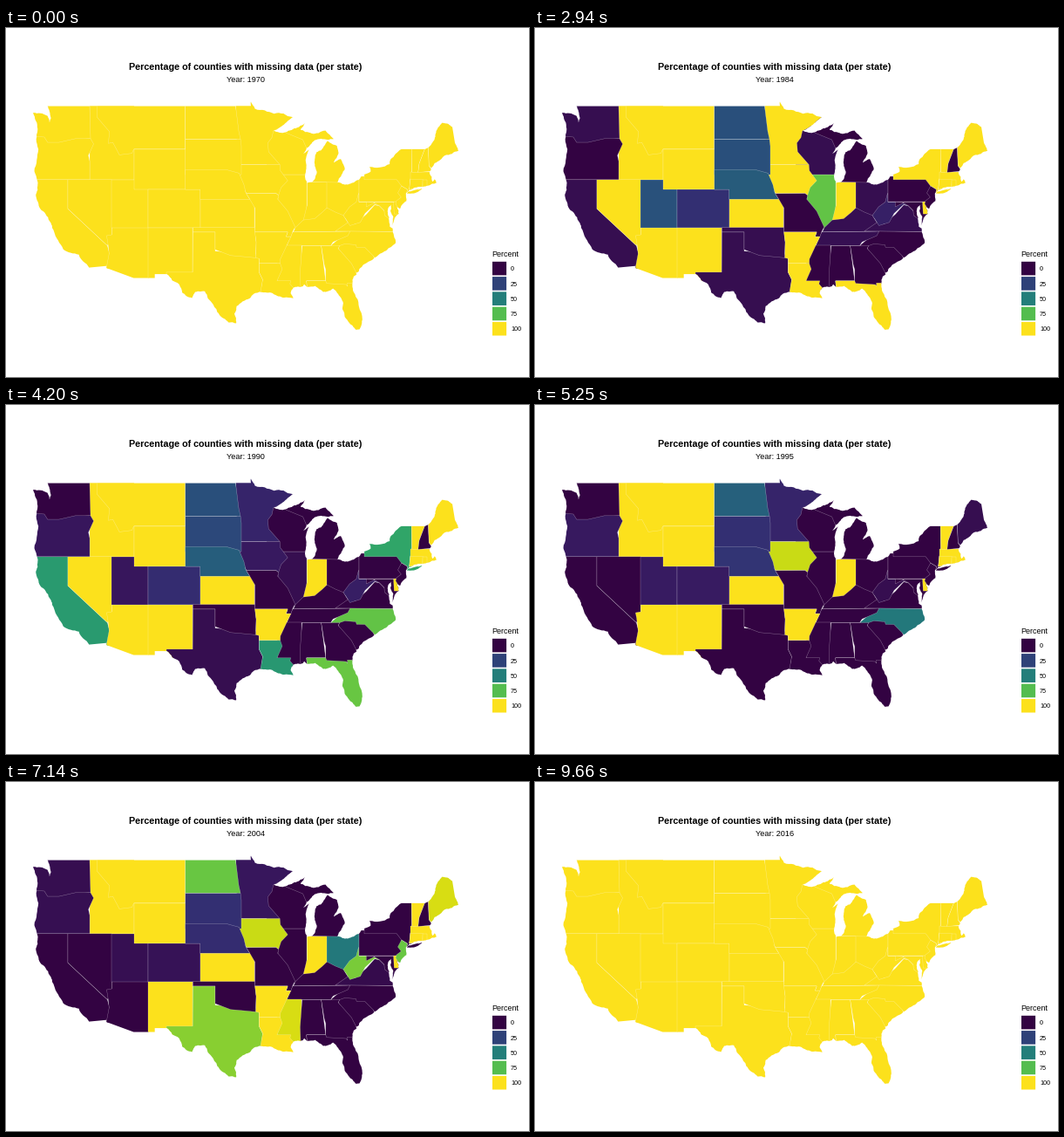
Recreate the animation shown at these times as a matplotlib script. Size 600 by 400 pixels, loop 9.87 s.

```python
import random

import matplotlib
import matplotlib.pyplot as plt
import numpy as np
from matplotlib.animation import FuncAnimation
from matplotlib.patches import Polygon, Rectangle
from matplotlib.path import Path

matplotlib.rcParams["font.family"] = "Liberation Sans"
FIRST_YEAR, LAST_YEAR, STEP_MS = 1970, 2016, 210

fig = plt.figure(figsize=(6, 4), dpi=100, facecolor="white")
ax = fig.add_axes([0, 0, 1, 1])
ax.set(xlim=(0, 600), ylim=(400, 0))
ax.axis("off")


def mercator(lat):
    return np.log(np.tan(np.pi / 4 + np.radians(lat) / 2))


def project(flat):
    """Degrees west and north, alternating, to stage pixels."""
    west, north = np.reshape(flat, (-1, 2)).T
    x = 31 + (124.73 - west) * 8.45
    y = 89.3 + 484 * (mercator(49) - mercator(north))
    return np.column_stack([x, y])


def shore(*flat, passes=3):
    """A coast through key points, roughened by seeded midpoint displacement."""
    rng = random.Random(len(flat))
    points = project(flat)
    for _ in range(passes):
        finer = [points[0]]
        for a, b in zip(points, points[1:]):
            dx, dy = b - a
            shift = rng.uniform(-0.1, 0.1)
            finer += [(a + b) / 2 + shift * np.array([-dy, dx]), b]
        points = np.array(finer)
    return points


def shade(percent):
    """Viridis, shown with a 1.8 display gamma."""
    rgb = np.array(matplotlib.colormaps["viridis"](percent / 100)[:3])
    r, g, b = np.where(rgb > 0.04, ((rgb + 0.055) / 1.055) ** 2.4, rgb / 12.92)
    return np.array([0.95 * r + 0.05 * g, g, b]) ** (1 / 1.8)


pacific = shore(122.76, 49, 122.5, 48.5, 122.3, 47.9, 122.5, 47.2, 122.75, 48.1, 124.73, 48.38,
                124.1, 46.9, 124, 45, 124.55, 42.85, 124.1, 41.5, 124.35, 40.4, 123.75, 39,
                122.5, 37.7, 121.9, 36.6, 120.63, 34.6, 118.5, 34, 117.12, 32.53)
south_line = project([114.72, 32.72, 114.81, 32.5, 111.07, 31.33, 108.2, 31.33, 108.2, 31.78])
gulf = shore(106.53, 31.78, 104.9, 30.6, 104.5, 29.65, 103.15, 28.98, 102.7, 29.7, 101.4, 29.77,
             100.3, 28.25, 99.45, 27, 98.2, 26.05, 97.15, 25.95, 97.4, 27.1, 97.1, 28,
             95.3, 28.95, 94.7, 29.5, 93.8, 29.7, 92.2, 29.55, 90.9, 29.05, 89.4, 28.95,
             89.75, 29.6, 89.4, 30.2, 88.1, 30.35, 87.9, 30.6, 87.5, 30.28, 86.4, 30.4,
             85.35, 29.7, 84, 30.1, 83.1, 29.2, 82.65, 28.5, 82.7, 27.6, 81.8, 26, 80.9, 25.15)
atlantic = shore(80.4, 25.2, 80.05, 26.8, 80.55, 28.45, 81.3, 29.9, 81.2, 31.5, 80.4, 32.4,
                 79.2, 33.2, 77.95, 33.87, 76.5, 34.7, 75.5, 35.3, 75.9, 36.9, 76.3, 37.1,
                 76.4, 38.1, 76.5, 39.1, 76.1, 39.4, 76.2, 38.8, 75.8, 38.1, 76, 37.2,
                 75.1, 38.45, 75.1, 38.8, 75.5, 39.5, 74.9, 39, 74.05, 39.8, 74.1, 40.6,
                 73.65, 40.95, 72, 41.3, 70.65, 41.55, 69.95, 41.7, 70.2, 42.05, 70.5, 41.8,
                 70.9, 42.7, 70.2, 43.65, 68.8, 44.4, 66.97, 44.85, 67.45, 45.6)
northeast = shore(67.8, 47.07, 68.3, 47.35, 69.23, 47.46, 70, 46.7, 70.4, 45.75, 71.5, 45)
lakes = shore(74.7, 45, 76.2, 44, 76.3, 43.55, 79.05, 43.27, 78.9, 42.8, 80.5, 41.98, 82, 41.5,
              83.45, 41.75, 83.1, 42.2, 82.42, 43, 82.95, 44.05, 83.9, 43.7, 83.3, 44.5,
              83.45, 45.3, 84.75, 45.78, 85.6, 44.9, 86.25, 44.7, 86.5, 43.6, 86.2, 42.8,
              86.82, 41.76, 87.5, 41.65, 87.8, 42.4, 87.7, 43.8, 87.2, 45, 88, 44.55,
              87.6, 45.1, 86.5, 45.85, 84.75, 45.9, 83.9, 45.97, 84.6, 46.45, 85, 46.75,
              87, 46.5, 88.45, 46.85, 87.8, 47.45, 88.9, 47, 90.4, 46.6, 92.1, 46.75, 89.5, 48,
              92, 48.3, 94.6, 48.75, 95.15, 49.38, 95.15, 49)
island = shore(74.02, 40.6, 73.8, 40.8, 72.3, 41.1, 72.5, 40.95, 71.9, 41.07, 73.5, 40.58)
mainland = np.vstack([pacific, south_line, gulf, atlantic, northeast, lakes])
land = Path.make_compound_path(*(Path(np.vstack([ring, ring[:1]]), closed=True)
                                 for ring in (mainland, island)))

states = {}


def area(name, *flat):
    """Clipped to the land; later areas cover the rough edges of earlier ones."""
    patch = Polygon(project(flat), closed=True, lw=0.3, ec=(1, 1, 1, 0.45))
    ax.add_patch(patch)
    patch.set_clip_path(land, ax.transData)
    states[name] = patch


def box(name, west, east, south, north):
    area(name, west, north, east, north, east, south, west, south)


# West
box("ID", 117.04, 111.05, 42, 49)
area("CA", 125, 42, 120, 42, 120, 39, 114.63, 35, 114.3, 34, 114.5, 32, 118, 32, 125, 38)
area("NV", 120, 42, 114.05, 42, 114.05, 36, 114.63, 35, 120, 39)
area("AZ", 114.05, 37, 109.05, 37, 109.05, 31, 115, 31, 114.72, 32.7, 114.4, 34.1, 114.6, 35.5,
     114.75, 36.1, 114.05, 36.2)
area("OR", 125, 46.5, 119, 46.2, 116.92, 46, 116.5, 45.5, 117.2, 44.4, 117.03, 43.83,
     117.03, 42, 125, 42)
area("WA", 126, 49, 117.04, 49, 116.92, 46, 118.98, 46, 121.2, 45.65, 122.75, 45.65,
     123.2, 46.15, 126, 46.3)
area("MT", 116.05, 49, 116.05, 48, 114.35, 46.65, 114.5, 45.55, 113.9, 45.65, 113, 44.45,
     111.3, 44.6, 111.05, 45, 104.05, 45, 104.05, 49)
box("UT", 114.05, 109.05, 37, 42)
box("WY", 111.05, 104.05, 41, 45)
box("CO", 109.05, 102.05, 37, 41)
box("NM", 109.05, 103.04, 31, 37)

# Plains and lakes
area("TX", 103.04, 36.5, 100, 36.5, 100, 34.4, 94.04, 34, 94.04, 32, 93.55, 31.15, 93.85, 29,
     97, 25, 104, 28, 106.62, 31.7, 106.62, 32, 103.06, 32)
box("KS", 102.05, 94.62, 37, 40)
area("OK", 103.04, 37, 94.62, 37, 94.43, 35.4, 94.48, 33.64, 96.5, 33.8, 97.9, 33.9,
     100, 34.56, 100, 36.5, 103.04, 36.5)
box("IL", 91.5, 87.53, 36.9, 42.5)
box("WI", 93, 86.8, 42.5, 47.2)
area("IN", 88.05, 37.7, 87.53, 39.35, 87.53, 41.76, 84.81, 41.76, 84.81, 37.7)
box("OH", 84.81, 80.52, 38, 42.1)
area("MI", 90.4, 46.55, 88.1, 45.9, 87.6, 45.1, 86.7, 45.3, 86.9, 41.76, 83.3, 41.72, 82, 43,
     83, 47, 87, 48, 90.4, 48)
area("MN", 97.23, 50, 89, 50, 89, 47.8, 92.1, 46.72, 92.3, 46.1, 92.85, 45.6, 92.75, 44.75,
     91.22, 43.5, 97, 43.5)
area("IA", 97, 43.5, 91.22, 43.5, 91.15, 42.9, 90.15, 41.9, 91.05, 41.2, 91.4, 40.4,
     91.73, 40.6, 95.77, 40.58, 96.6, 42)
area("ND", 104.05, 49, 97.23, 49, 96.8, 46.7, 96.56, 45.94, 104.05, 45.94)
area("SD", 104.05, 45.94, 96.56, 45.94, 96.45, 45.3, 96.45, 42.5, 104.05, 42.5)
area("NE", 104.05, 43, 98.5, 43, 96.75, 42.65, 96.1, 41.5, 95.85, 40.7, 95.3, 40, 102.05, 40,
     102.05, 41, 104.05, 41)

# South
area("KY", 89.4, 36.5, 81.7, 36.6, 81.97, 37.54, 82.6, 38.3, 83.7, 38.65, 84.82, 39.1,
     85.5, 38.6, 86.5, 37.95, 88.05, 37.8, 89.1, 37)
area("NC", 84.32, 35, 78.55, 33.8, 77.5, 33, 75, 35, 75, 36.55, 82, 36.6)
area("SC", 83.1, 35, 82.4, 35.2, 80.9, 35.1, 80.8, 34.82, 79.67, 34.8, 78.55, 33.87, 78, 33,
     80.9, 31.9, 82, 33, 83.3, 34.7)
area("TN", 90.3, 35, 89.5, 36.5, 81.68, 36.58, 82, 36.1, 84, 35.4, 84.32, 35)
area("MO", 95.77, 40.58, 91.73, 40.6, 91.4, 40.4, 91.5, 40, 90.15, 38.75, 89.15, 37.05,
     89.5, 36.5, 89.7, 36, 90.37, 36, 90.15, 36.5, 94.62, 36.5, 94.62, 39.1, 95.3, 40)
box("MS", 91.65, 88.3, 30, 35)
area("AL", 88.2, 35, 85.6, 35, 85, 31, 87.6, 31, 87.5, 30, 88.4, 30, 88.47, 31.9)
area("GA", 85.6, 35, 83.1, 35, 83.3, 34.7, 81.5, 33, 80.9, 32.03, 80.5, 31, 82, 30.4,
     85, 30.5, 85, 32.3, 85.2, 32.9)
area("FL", 87.6, 31, 85, 31, 84.86, 30.7, 82.2, 30.57, 82.05, 30.36, 82.05, 30.75, 80, 30.75,
     79, 25, 82, 24.5, 84, 29, 87.5, 30)
area("AR", 94.62, 36.5, 90.15, 36.5, 90.37, 36, 89.7, 36, 90.3, 35, 91.15, 33.5, 91.17, 33,
     94.04, 33, 94.04, 33.55, 94.48, 33.64, 94.43, 35.4)
area("LA", 94.04, 33, 91.17, 33, 90.9, 32.35, 91.6, 31, 89.73, 31, 89.85, 30.65, 89.3, 30.1,
     88.5, 28.5, 94, 29, 93.7, 30.4, 93.55, 31.15, 94.04, 32)

# East
area("VA", 83.68, 36.6, 75, 36.55, 75, 38, 76.8, 38.2, 77.05, 38.8, 77.72, 39.32, 78.35, 39.4,
     79.5, 38.4, 81, 37.4, 81.97, 37.54)
area("WV", 82.6, 38.3, 81.75, 39.2, 80.85, 39.7, 80.52, 40.64, 80.52, 39.72, 79.48, 39.72,
     77.72, 39.5, 77.72, 39.32, 78.35, 39.45, 79.65, 38.5, 80.3, 37.55, 81.7, 37.2, 81.97, 37.54)
area("MD", 79.48, 39.72, 79.48, 39.2, 78.4, 39.62, 77.72, 39.32, 77.05, 38.8, 77, 38.3,
     76.5, 38, 75, 38, 75, 39.72)
area("DE", 75.79, 39.72, 75.7, 38.45, 75, 38.45, 75.3, 39.8)
box("PA", 80.52, 74.7, 39.72, 42.3)
area("NY", 79.76, 43.5, 79.76, 42, 75.35, 42, 74.7, 41.36, 73.9, 41, 74.05, 40.5, 71.8, 40.5,
     71.8, 41.15, 73.65, 41, 73.5, 42.05, 73.3, 42.75, 73.35, 45.1, 76.5, 45.1)
area("NJ", 74.7, 41.36, 73.9, 41, 74.05, 40.5, 73.5, 40, 74.9, 38.8, 75.5, 39.5, 75.4, 39.82,
     74.75, 40.2, 75.2, 40.65)
box("MA", 73.5, 69.5, 41.2, 42.75)
area("CT", 73.5, 42.05, 71.8, 42.02, 71.86, 41.2, 73.65, 41)
box("RI", 71.83, 71.2, 41.2, 42.02)
area("VT", 73.35, 45.1, 71.5, 45.1, 72.3, 43.6, 72.45, 42.73, 73.3, 42.75)
area("NH", 71.5, 45.1, 72.3, 43.6, 72.45, 42.73, 70.5, 42.85, 70.97, 43.4, 71.08, 45.4)
area("ME", 71.08, 45.6, 70.97, 43.4, 70.5, 43, 66, 44, 66, 48, 71, 48)


def survey(full, **partial):
    return {**dict.fromkeys(states, 0), **dict.fromkeys(full.split(), 100), **partial}


surveys = {
    1980: survey(" ".join(states)),
    1984: survey("ID MT WY NV AZ NM KS MN IA IN AR LA FL NY VT ME MA CT RI DE",
                 WA=4, CA=4, UT=32, CO=18, ND=31, SD=31, NE=36, TX=4, OK=4, WI=4, IL=78,
                 OH=4, KY=5, TN=5, VA=5, WV=12),
    1990: survey("ID MT WY NV AZ NM KS IN AR VT ME MA CT RI DE",
                 OR=8, CA=61, UT=8, CO=17, ND=31, SD=28, NE=37, TX=4, MN=14, IA=9, IL=4,
                 LA=60, NY=65, NC=78, FL=79, WV=11),
    1995: survey("ID MT WY AZ NM KS IN AR VT MA CT RI DE",
                 OR=9, UT=10, CO=10, ND=38, SD=18, NE=20, MN=14, IA=93, NC=48, WV=4, ME=4),
    2000: survey("ID MT WY NM KS IN AR LA VT MA CT RI DE",
                 WA=4, OR=5, UT=5, CO=6, ND=79, SD=18, NE=17, TX=84, MN=8, IA=93, OH=48,
                 MS=95, WV=82, VA=3, NJ=79, ME=95),
    2010: survey("ID MT NM KS AR LA VT CT RI DE",
                 OR=5, UT=12, ND=38, SD=18, NE=12, IA=2, MS=95, VA=78, ME=95),
    2015: survey("WA ID MT NM KS AR VT CT RI DE", OR=5, UT=12, ND=38, SD=18, NE=12),
    2016: survey(" ".join(states)),
}


def timeline(name):
    """Percent for every year, with one jump between neighbouring surveys."""
    rng = random.Random(name)
    years = list(surveys)
    jumps = {years[0]: FIRST_YEAR}
    for start, end in zip(years, years[1:]):
        middle = (start + end + 1) // 2
        jumps[end] = min(end, middle + rng.choice([0, 0, 1]))
    return [surveys[max(y for y in years if jumps[y] <= year)][name]
            for year in range(FIRST_YEAR, LAST_YEAR + 1)]


timelines = {name: timeline(name) for name in states}

ax.text(275, 48, "Percentage of counties with missing data (per state)",
        size=7.72, weight="bold", ha="center", va="baseline")
year_label = ax.text(275, 62, "", size=6.55, ha="center", va="baseline")
ax.text(557, 262, "Percent", size=6.5, va="baseline")
for i, percent in enumerate([0, 25, 50, 75, 100]):
    middle = 275.6 + 17.28 * i
    ax.add_patch(Rectangle((558, middle - 7.8), 16.1, 15.6, fc=shade(percent), lw=0,
                           snap=False))
    ax.text(579, middle + 2.7, str(percent), size=5.2, va="baseline")


def update(frame):
    year_label.set_text(f"Year: {FIRST_YEAR + frame}")
    for name, patch in states.items():
        patch.set_facecolor(shade(timelines[name][frame]))
    return [year_label]


animation = FuncAnimation(fig, update, frames=LAST_YEAR - FIRST_YEAR + 1,
                          interval=STEP_MS, repeat=True, repeat_delay=0)
plt.show()
```
